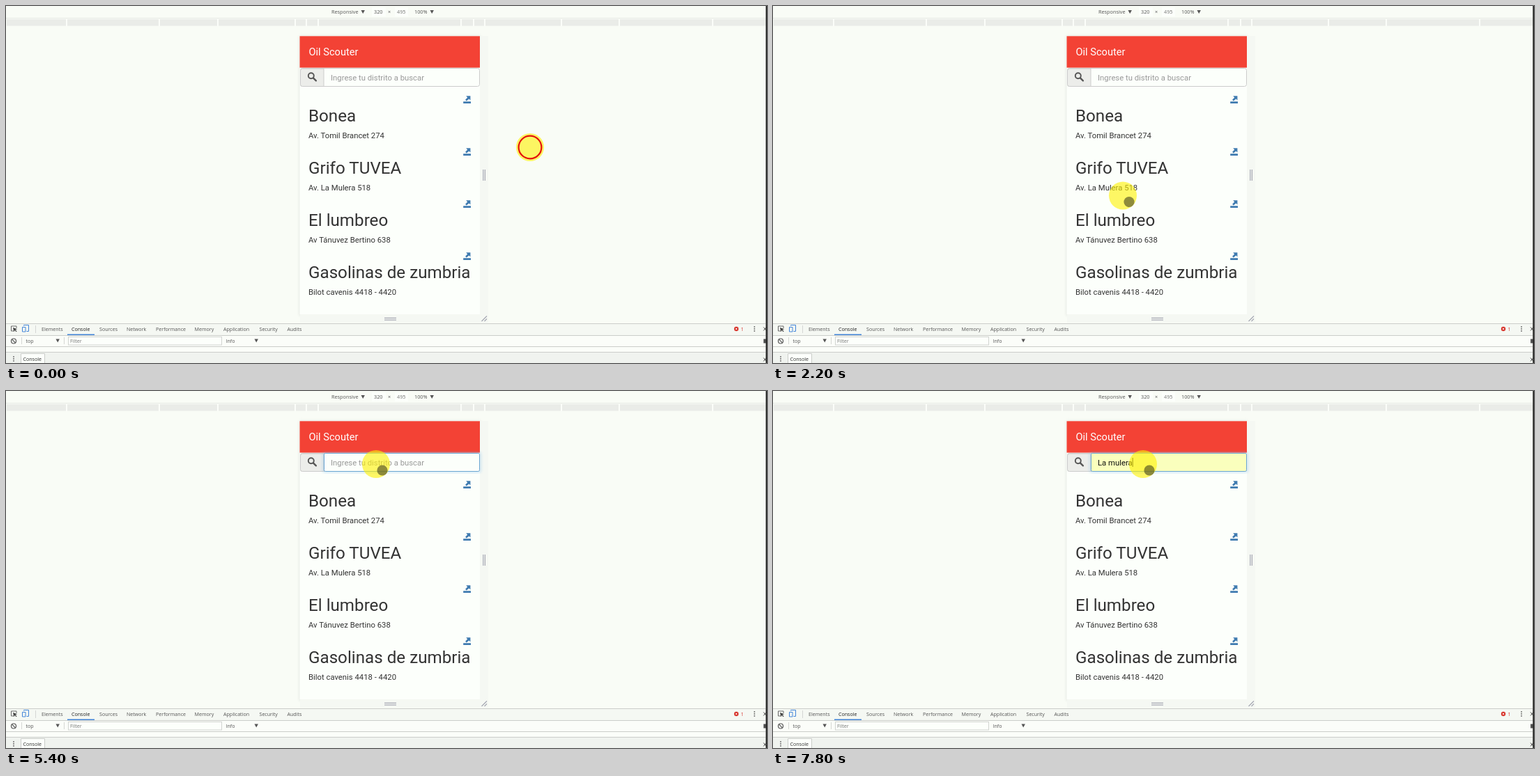
An HTML page for the animation above (8 s loop, 1092 by 513 pixels).

```html
<!DOCTYPE html>
<html lang="es">
<head>
<meta charset="utf-8">
<title>Buscador</title>
<style>
  html, body { margin: 0; width: 100%; height: 100%; overflow: hidden; background: #f9fcf6; }
  svg { display: block; width: 100vw; height: 100vh; }
  text { font-family: Roboto, sans-serif; fill: #333; white-space: pre; }
  .tool text { font: 7.1px "Open Sans", sans-serif; fill: #555; }
  .tool.bar text { font-size: 7.3px; }
  .name { font-size: 24.2px; }
  .body { font-size: 11.3px; }
  .row { font: 700 8.8px "Open Sans", sans-serif; fill: #111; }
</style>
</head>
<body>
<svg viewBox="0 0 1092 513" preserveAspectRatio="none">
  <defs>
    <filter id="soft" x="-10%" y="-10%" width="120%" height="120%"><feGaussianBlur stdDeviation="2"/></filter>
    <path id="share" d="M0 8.2h10.8v2.8H0z M4 .3h6.2v6.2L8.2 4.6 4.6 7.6 2.9 5.8 6 2.4z" fill="#3f7bb0"/>
    <path id="down" d="M0 0h5.4l-2.7 5z" fill="#555"/>
    <g id="dots" fill="#666"><circle r=".9" cy="-3"/><circle r=".9"/><circle r=".9" cy="3"/></g>
    <path id="close" d="M-2-2.5l4 5M2-2.5l-4 5" stroke="#555"/>
  </defs>

  <rect width="1092" height="513" fill="#f9fcf6"/>

  <!-- device toolbar and ruler -->
  <g class="tool bar">
    <path d="M0 17.5h1090" stroke="#e6e9e4"/>
    <text x="467" y="11">Responsive</text><use href="#down" x="509.5" y="6"/>
    <rect x="525" y="2" width="20" height="13" fill="#fcfffb"/>
    <rect x="558" y="2" width="19" height="13" fill="#fcfffb"/>
    <text x="528" y="11">320</text><text x="548" y="11">×</text>
    <text x="561" y="11" style="fill:#777">495</text>
    <text x="586" y="11">100%</text><use href="#down" x="608.5" y="6"/>
    <rect x="1" y="19" width="1089" height="9.5" fill="#eaece8"/>
    <g id="ticks" stroke="#fbfdf9" stroke-width="2"></g>
  </g>

  <!-- phone -->
  <rect x="421" y="43" width="260" height="402" fill="#b9bdb8" opacity=".35" filter="url(#soft)"/>
  <path d="M680 43h12v412H422v-12h258z" fill="#f5f8f3"/>
  <rect x="421.5" y="43" width="258.5" height="400" fill="#fcfffb"/>
  <path d="M684.8 235v16M687.4 235v16M543 448.4h17M543 451.2h17M682.5 453l7.5-7.5M686.5 453l3.5-3.5"
    stroke="#a6a8b3" stroke-width="1.2"/>
  <rect x="421.5" y="43.3" width="258.5" height="45.3" fill="#f34235"/>
  <text x="434.5" y="70.8" style="font-size:14.6px;fill:#fff">Oil Scouter</text>
  <g id="list"></g>

  <!-- search box -->
  <rect x="422.5" y="89.5" width="257" height="26" rx="3" fill="#fcfffb" stroke="#ccc"/>
  <path d="M456 90h-30.5q-3 0-3 3v19.5q0 3 3 3H456z" fill="#ecedea" stroke="#ccc"/>
  <circle cx="437.8" cy="100.3" r="4" fill="none" stroke="#555" stroke-width="1.9"/>
  <path d="M440.9 103.4l4 4" stroke="#555" stroke-width="2.3" stroke-linecap="round"/>
  <g id="focus">
    <rect x="456" y="89" width="224" height="27" rx="2" fill="none" stroke="#66afe9" stroke-width="3" opacity=".35" filter="url(#soft)"/>
    <rect id="field" x="456.5" y="89.5" width="223" height="26" rx="2" stroke="#6ba6d2"/>
  </g>
  <text id="hint" class="body" x="466" y="106.5" style="fill:#999">Ingrese tu distrito a buscar</text>
  <text id="typed" class="body" x="466" y="106.5"></text>
  <rect id="caret" y="96" width="1" height="13" fill="#222"/>

  <!-- suggestions -->
  <g id="popup">
    <rect id="void" x="456" y="116" width="224" height="79" fill="#000"/>
    <rect id="sheet" x="456" y="116.5" width="223.5" fill="#fcfffb" stroke="#d2d4d1" stroke-width=".7"/>
    <rect id="mark" x="456.5" y="117" width="223" height="19.5" fill="#dcdedb"/>
    <g id="rows"></g>
  </g>

  <!-- developer panel -->
  <g class="tool">
    <rect y="456" width="1090" height="57" fill="#f5f8f3"/>
    <path d="M0 474h1090v23H0z" fill="#fbfdf9"/>
    <path d="M0 456.5h1090M0 473.5h1090M0 489.5h1090M0 497.5h1090" stroke="#cbcdca"/>
    <path d="M0 498h1090v15H0z" fill="#f0f3ef"/>
    <path d="M12 467H7.5v-7h7.5v3" fill="none" stroke="#666"/>
    <path d="M10 462l6 2.3-2.4 1 2 2.2-1 .8-2-2.2-1.3 2z" fill="#444"/>
    <path d="M25.5 459.5v-1h7v9h-3M23.5 461.5h4.5v6.500h-4.5z" fill="none" stroke="#4285d9"/>
    <path d="M42.5 459v11M22.5 476v10M83.5 476v10" stroke="#d5d7d4"/>
    <g id="tabs"></g>
    <path d="M88 472.3h39" stroke="#4285d9" stroke-width="1.5"/>
    <circle cx="1048" cy="464" r="3.2" fill="#d8372f"/>
    <path d="M1046.8 462.8l2.4 2.4M1049.2 462.8l-2.4 2.4" stroke="#fff" stroke-width=".8"/>
    <text x="1054.5" y="466.7" style="fill:#d8372f">1</text>
    <use href="#dots" x="1074" y="464"/><use href="#close" x="1089" y="464"/>
    <circle cx="11" cy="481.5" r="3.5" fill="none" stroke="#555" stroke-width="1.2"/>
    <path d="M8.6 479.1l4.8 4.8" stroke="#555" stroke-width="1.2"/>
    <text x="28.5" y="484">top</text><use href="#down" x="71.5" y="478.5"/>
    <rect x="89.5" y="475.5" width="220" height="11.5" fill="#fcfffb" stroke="#d2d4d1"/>
    <text x="92" y="484" style="fill:#777">Filter</text>
    <text x="315.5" y="484">Info</text><use href="#down" x="356.5" y="478.5"/>
    <rect x="1087" y="478.5" width="4" height="6" fill="#555"/>
    <use href="#dots" x="11" y="507"/>
    <path d="M21.5 513v-13.5h34V513" fill="#fcfffb" stroke="#cbcdca"/>
    <text x="24.5" y="510.3" style="fill:#333">Console</text>
    <use href="#close" x="1089" y="508"/>
  </g>
  <rect x="1090.3" width="1.7" height="513" fill="#242424"/>

  <g id="cursor">
    <circle r="20" fill="#fff200" opacity=".6"/>
    <circle id="ring" fill="none" stroke="#e5120c" stroke-width="2.2"/>
    <circle id="touch" cx="9" cy="9" r="7.6" fill="#33331a" opacity=".55"/>
  </g>
</svg>
<script>
const $ = id => document.getElementById(id);
const LOOP = 8000, STEP = 200;

const stations = [
  ['Bonea', 'Av. Tomil Brancet 274'],
  ['Grifo TUVEA', 'Av. La Mulera 518'],
  ['El lumbreo', 'Av Tánuvez Bertino 638'],
  ['Gasolinas de zumbria', 'Bilot cavenis 4418 - 4420']
];
$('list').innerHTML = stations.map(([name, street], i) => `
  <g transform="translate(0 ${i * 75})">
    <use href="#share" x="656.2" y="129"/>
    <text class="name" x="434" y="166">${name}</text>
    <text class="body" x="434" y="190.3">${street}</text>
  </g>`).join('');

const tabs = { Elements: 51, Console: 94, Sources: 134, Network: 173, Performance: 215,
  Memory: 270.5, Application: 312, Security: 363.5, Audits: 403.5 };
$('tabs').innerHTML = Object.entries(tabs).map(([name, x]) =>
  `<text x="${x}" y="466.7"${name === 'Console' ? ' style="fill:#222"' : ''}>${name}</text>`).join('');

$('ticks').innerHTML = [87, 220, 304, 415, 431, 448, 653, 671, 687, 797, 880, 1014]
  .map(x => `<path d="M${x} 19v10"/>`).join('');

const districts = ['La mulera', 'la cidra', 'lomada', 'los telares'];
$('rows').innerHTML = districts.map((d, i) =>
  `<text class="row" x="463" y="${129.7 + i * 19.5}">${d}</text>`).join('');
const rows = [...$('rows').children];

// time, x, y
const path = [
  [0, 752, 203], [800, 752, 203], [1400, 535, 214], [2000, 530, 119],
  [2400, 474, 426], [3000, 546, 229], [3200, 542, 246], [3400, 559, 238],
  [4000, 552, 209], [4400, 524, 73], [4600, 460, 92], [4800, 506, 108],
  [5200, 531, 105], [LOOP, 531, 105]
];
function place(t) {
  const i = path.findIndex(p => p[0] > t);
  const [t0, x0, y0] = path[i - 1], [t1, x1, y1] = path[i];
  const k = (t - t0) / (t1 - t0);
  return [x0 + (x1 - x0) * k, y0 + (y1 - y0) * k];
}

// time, field text, suggestions shown
const typing = [
  [0, '', 0], [5800, 'l', 4], [6000, 'la ', 4], [6200, 'la m', 2],
  [6400, 'la m', 1], [6800, 'La mulera', 1], [7000, 'La mulera', 0]
];

const show = (id, on) => $(id).setAttribute('visibility', on ? 'visible' : 'hidden');

function draw(t) {
  const [x, y] = place(t);
  $('cursor').setAttribute('transform', `translate(${x} ${y})`);
  show('ring', t < 600);
  $('ring').setAttribute('r', 16.4 - t / 50);
  show('touch', x > 422 && x < 680);

  const [, text, count] = typing.findLast(s => s[0] <= t);
  const focused = t >= 5000, chosen = t >= 6800;
  show('focus', focused);
  $('field').setAttribute('fill', chosen ? '#faffbd' : '#fcfffb');
  show('hint', !text);
  $('typed').textContent = text;
  $('typed').style.fill = chosen ? '#111' : '#555';
  const blink = t === 5000 || t === 5200 || t >= 5600 && t < 7200 || t >= 7600;
  show('caret', focused && blink);
  $('caret').setAttribute('x', 466 + $('typed').getComputedTextLength());

  $('popup').style.display = count ? '' : 'none';
  $('sheet').setAttribute('height', count * 19.5 + 1);
  show('void', count === 2);
  show('mark', chosen);
  rows.forEach((r, i) => r.setAttribute('visibility', i < count ? 'visible' : 'hidden'));
}

const start = performance.now();
function tick() {
  const t = (performance.now() - start) % LOOP;
  draw(Math.floor(t / STEP) * STEP);
  requestAnimationFrame(tick);
}
tick();
</script>
</body>
</html>
```
